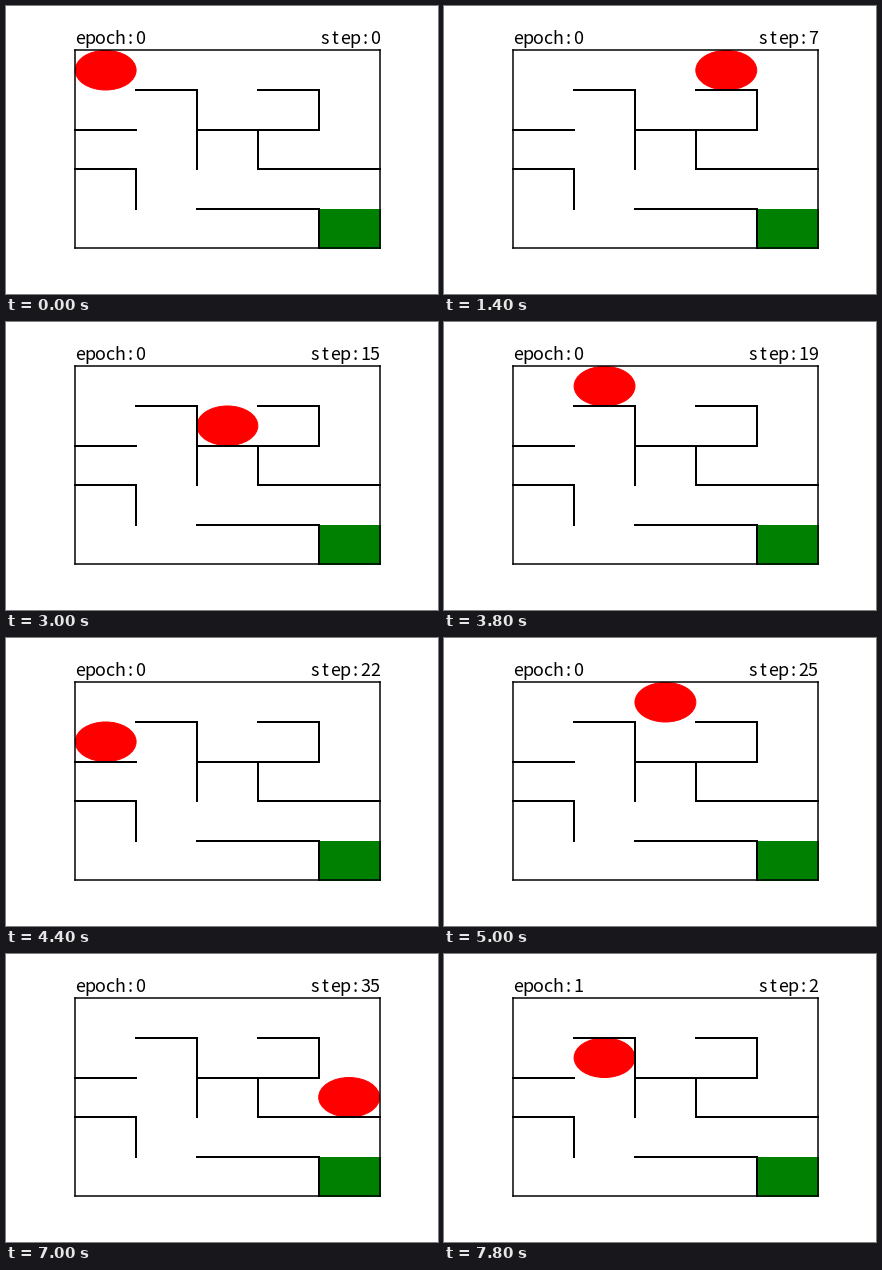
Animation, 432 px wide and 288 px high, one loop 8 s. Source, as a matplotlib script:

```python
import matplotlib.pyplot as plt
from matplotlib.animation import FuncAnimation
from matplotlib.patches import Ellipse, Rectangle

W, H, DPI = 432, 288, 72
SIZE = 5
STEP_MS = 200
CHAR_W, BASELINE = 10, 37.5

# Inner walls as (x0, y0, x1, y1) in cells, counted from the top left
WALLS = [
    (1, 1, 2, 1), (3, 1, 4, 1), (0, 2, 1, 2), (2, 2, 4, 2),
    (0, 3, 1, 3), (3, 3, 5, 3), (2, 4, 4, 4),
    (2, 1, 2, 3), (4, 1, 4, 2), (3, 2, 3, 3), (1, 3, 1, 4), (4, 4, 4, 5),
]

# One move per step; "." is a bump into a wall
EPOCHS = [
    ".R.R.R.RD.U.LLD.UL.LD.URRRRDD.U..D..",
    "DR",
]
MOVES = {"L": (-1, 0), "R": (1, 0), "U": (0, -1), "D": (0, 1), ".": (0, 0)}


def walk():
    """List (epoch, step, col, row) for every step of every epoch."""
    states = []
    for epoch, moves in enumerate(EPOCHS):
        col = row = 0
        states.append((epoch, 0, col, row))
        for step, move in enumerate(moves, 1):
            dx, dy = MOVES[move]
            col, row = col + dx, row + dy
            states.append((epoch, step, col, row))
    return states


STATES = walk()

fig = plt.figure(figsize=(W / DPI, H / DPI), dpi=DPI, facecolor="white")
ax = fig.add_axes([0.125, 0.125, 0.775, 0.755])
ax.set_xlim(-SIZE * 0.05, SIZE * 1.05)
ax.set_ylim(SIZE * 1.05, -SIZE * 0.05)
ax.axis("off")

ax.add_patch(Rectangle((4, 4), 1, 1, color="green", lw=1))
ball = ax.add_patch(Ellipse((0.5, 0.5), 1, 1, color="red", lw=1))

for k in (0, SIZE):
    ax.plot([0, SIZE], [k, k], "k", lw=1.5, clip_on=False)
    ax.plot([k, k], [0, SIZE], "k", lw=1.5, clip_on=False)
for x0, y0, x1, y1 in WALLS:
    ax.plot([x0, x1], [y0, y1], "k", lw=2)


def make_cells(left, count):
    """Fixed-pitch row of single-character labels."""
    return [
        fig.text((left + (i + 0.5) * CHAR_W) / W, 1 - BASELINE / H, "",
                 ha="center", va="baseline", color="black",
                 fontname="Noto Sans CJK JP", fontsize=18)
        for i in range(count)
    ]


def write(cells, text):
    for cell, char in zip(cells, text):
        cell.set_text(char)


epoch_cells = make_cells(69, 7)
step_cells = make_cells(304, 7)


def draw(i):
    epoch, step, col, row = STATES[i]
    ball.set_center((col + 0.5, row + 0.5))
    write(epoch_cells, f"epoch:{epoch}")
    write(step_cells, f"step:{step}".rjust(len(step_cells)))
    return [ball, *epoch_cells, *step_cells]


anim = FuncAnimation(fig, draw, frames=len(STATES), interval=STEP_MS,
                     repeat=True, repeat_delay=0, blit=False)
plt.show()
```
